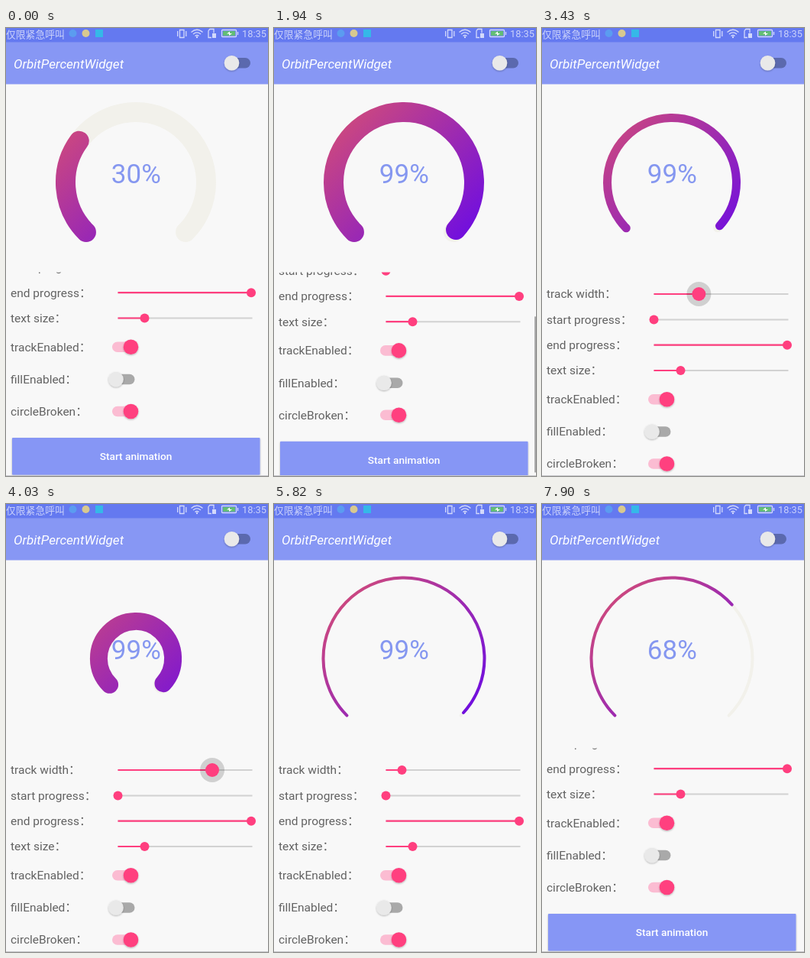
Write an HTML page that moves like this. It is 343 px wide and 586 px high and loops after 8000 ms.

```html
<!DOCTYPE html>
<html lang="zh-CN">
<head>
<meta charset="utf-8">
<title>Progress ring settings</title>
<style>
  html, body { margin: 0; width: 100%; height: 100%; overflow: hidden; background: #f8f8f8; }
  svg { display: block; width: 100vw; height: 100vh; }
  text { font-family: Roboto, "Noto Sans CJK SC", "Noto Sans CJK", sans-serif; }
  .label { font-size: 15.5px; fill: #626262; }
</style>
</head>
<body>
<svg viewBox="0 0 343 586">
  <defs>
    <linearGradient id="sweep" gradientUnits="userSpaceOnUse" x1="65" y1="97" x2="275" y2="307">
      <stop stop-color="#db5170"/>
      <stop offset="1" stop-color="#6004f0"/>
    </linearGradient>
    <clipPath id="viewport"><rect y="319.5" width="343" height="266.5"/></clipPath>
    <filter id="shadow" x="-30%" y="-30%" width="160%" height="160%">
      <feDropShadow dx="0" dy="1" stdDeviation="1" flood-opacity=".3"/>
    </filter>
  </defs>
  <rect width="343" height="586" fill="#f8f8f8"/>

  <g id="ring" fill="none" stroke-linecap="round">
    <path id="track" stroke="#f2f1eb"/>
    <path id="progress" stroke="url(#sweep)"/>
  </g>
  <text id="percent" x="170.3" y="203" font-size="35" fill="#8597f0" text-anchor="middle"></text>

  <g clip-path="url(#viewport)">
    <g id="list"></g>
    <rect id="scrollbar" x="341" width="2" height="204" fill="#a9a9a9"/>
  </g>
  <rect y="585" width="343" height="1" fill="#c8c8cc"/>

  <rect y="18" width="343" height="55.5" fill="#8797f4"/>
  <rect width="343" height="18.5" fill="#6479f0"/>
  <text x="10" y="52.5" font-size="17.1" font-style="italic" fill="#fff">OrbitPercentWidget</text>
  <g id="themeSwitch"></g>

  <g fill="#ccd3fa">
    <text x="0" y="12.5" font-size="12.8">仅限紧急呼叫</text>
    <text x="309" y="12.3" font-size="12.8">18:35</text>
  </g>
  <circle cx="87.5" cy="7" r="5" fill="#5b9cf0"/>
  <circle cx="104.5" cy="7" r="5" fill="#d8c990"/>
  <rect x="117" y="2" width="10" height="10" fill="#35b8e8"/>
  <g fill="none" stroke="#d3d9fb" stroke-width="1.3">
    <path d="M227.5 2.5h5.500v10h-5.500zM224.700 4v7M235.800 4v7"/>
    <path d="M242.500 5.500Q250 -1 257.500 5.500M245 8Q250 3.700 255 8M247.500 10.500Q250 8.500 252.500 10.500"/>
    <path d="M265 3.500l2-2h5v5M265 3.500v9h4"/>
    <rect x="282.500" y="2.500" width="19" height="9" rx="1"/>
    <path d="M303.500 5v4"/>
  </g>
  <rect x="270" y="7" width="5" height="6" fill="#d3d9fb"/>
  <rect x="284" y="4" width="16" height="6" fill="#62bd76"/>
  <path d="M289 7.500l4-3v2.500h3l-4 3v-2.500z" fill="#fff"/>
  <circle cx="250" cy="12" r="1.200" fill="#d3d9fb"/>
</svg>
<script>
const LOOP = 8000, STEP = 149;
const SCROLL_MAX = 68.5, END_PERCENT = 99;
const PINK = '#ff3f7f';
const $ = id => document.getElementById(id);

const label = (text, y) => `<text class="label" x="6" y="${y + 5.3}">${text}：</text>`;

const slider = (text, y, x, id = 'row' + y) => label(text, y) + `
  <path d="M146.5 ${y}H322.5" stroke="#d2d2d2" stroke-width="2"/>
  <path id="${id}Fill" d="M146.5 ${y}H${x}" stroke="${PINK}" stroke-width="2.2"/>
  <circle id="${id}Halo" cx="${x}" cy="${y}" r="16" fill="#000" fill-opacity=".16" opacity="0"/>
  <circle id="${id}Thumb" cx="${x}" cy="${y}" r="6" fill="${PINK}"/>`;

const toggle = (cx, y, on, pill) => `
  <rect x="${cx - 14.5}" y="${y - 6.8}" width="29" height="13.6" rx="6.8" fill="${pill}"/>
  <circle cx="${cx + (on ? 10 : -10)}" cy="${y}" r="9.8" fill="${on ? PINK : '#e9e9e9'}" filter="url(#shadow)"/>`;

const switchRow = (text, y, on) =>
  label(text, y) + toggle(on ? 153.5 : 154, y, on, on ? '#fbbcd2' : '#a9a9a9');

$('list').innerHTML =
  slider('track width', 348, 181.5, 'width') +
  slider('start progress', 381.5, 146.5) +
  slider('end progress', 414.7, 321) +
  slider('text size', 448, 181.5) +
  switchRow('trackEnabled', 485.7, true) +
  switchRow('fillEnabled', 528, false) +
  switchRow('circleBroken', 570, true) + `
  <rect x="8" y="604.5" width="324.500" height="48.5" rx="1" fill="#8696f5" filter="url(#shadow)"/>
  <text x="170" y="633.7" font-size="13.7" font-weight="500" fill="#fff" text-anchor="middle">Start animation</text>`;
$('themeSwitch').innerHTML = toggle(305.5, 45.8, false, '#5b69ae');

// Eased value at time t from [time, value] pairs.
function keyed(t, keys) {
  const next = keys.findIndex(([time]) => time > t);
  if (next === 0) return keys[0][1];
  if (next < 0) return keys[keys.length - 1][1];
  const [t0, a] = keys[next - 1], [t1, b] = keys[next];
  const u = (t - t0) / (t1 - t0);
  return a + (b - a) * u * u * (3 - 2 * u);
}

const scrollKeys = [[1820, SCROLL_MAX], [2550, 0], [6450, 0], [6850, SCROLL_MAX]];
const barKeys = [[1790, 0], [1930, 1], [2700, 1], [2980, 0], [6410, 0], [6550, 1], [7000, 1], [7150, 0]];
const thumbKeys = [[3120, 181.5], [4020, 270], [4170, 270], [4620, 187], [5200, 167.5]];
const haloKeys = [[2970, 0], [3120, 1], [5200, 1], [5500, 0]];

function percentAt(t) {
  const elapsed = t >= 7152 ? t - 7152 : t + 446;
  const u = Math.min(1, elapsed / 1200);
  return END_PERCENT * (1 - Math.cos(Math.PI * u)) / 2;
}

function arc(radius, percent) {
  const point = p => {
    const angle = (135 + 2.7 * p) * Math.PI / 180;
    return `${170 + radius * Math.cos(angle)} ${202 + radius * Math.sin(angle)}`;
  };
  return `M${point(0)}A${radius} ${radius} 0 ${percent * 2.7 > 180 ? 1 : 0} 1 ${point(percent)}`;
}

function render(time) {
  const t = Math.floor((time % LOOP + 2) / STEP) * STEP;

  const thumb = keyed(t, thumbKeys);
  const resized = t >= 3120;
  const radius = resized ? 105.5 - .555 * (thumb - 167.5) : 92;
  const percent = percentAt(t);
  $('ring').setAttribute('stroke-width', resized ? 4 + .185 * (thumb - 167.5) : 26);
  $('track').setAttribute('d', arc(radius, 100));
  $('progress').setAttribute('d', arc(radius, percent));
  $('percent').textContent = Math.round(percent) + '%';

  const halo = keyed(t, haloKeys);
  $('widthFill').setAttribute('d', `M146.5 348H${thumb}`);
  $('widthHalo').setAttribute('cx', thumb);
  $('widthHalo').setAttribute('opacity', halo);
  $('widthThumb').setAttribute('cx', thumb);
  $('widthThumb').setAttribute('r', 6 + 3 * halo);

  const scroll = keyed(t, scrollKeys);
  $('list').setAttribute('transform', `translate(0 ${-scroll})`);
  $('scrollbar').setAttribute('y', 320 + scroll * .9);
  $('scrollbar').setAttribute('opacity', keyed(t, barKeys));
}

const start = performance.now();
function tick() {
  render(performance.now() - start);
  requestAnimationFrame(tick);
}
tick();
</script>
</body>
</html>
```
